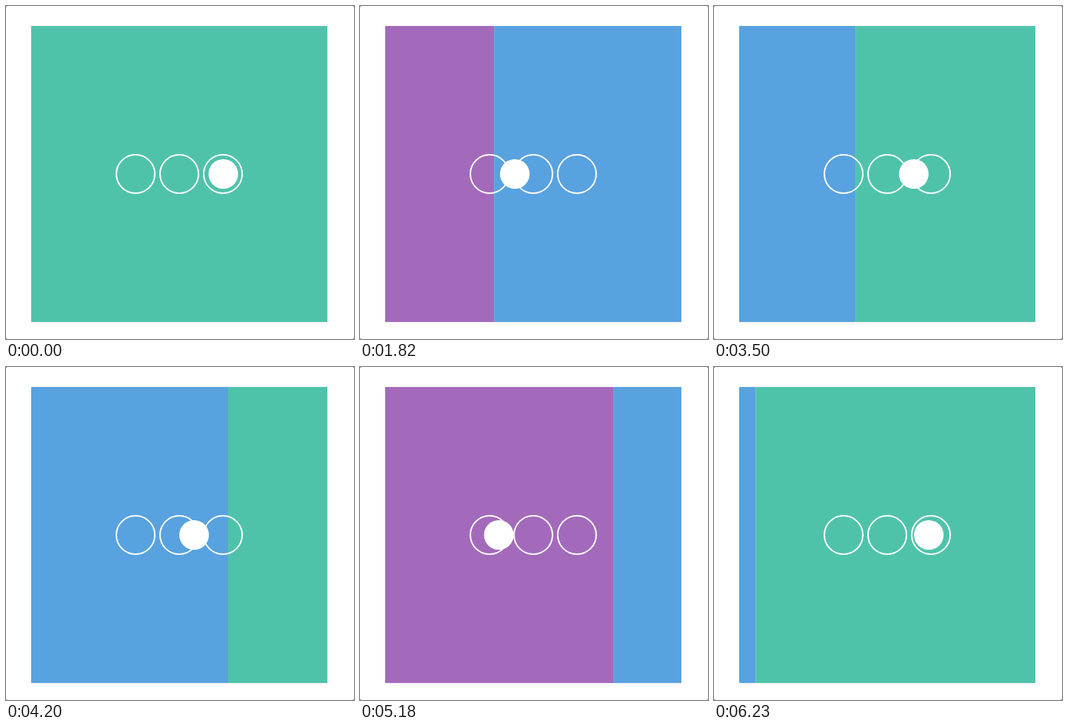
Animation of 470 by 450 pixels, one loop 6.3 s. Source, as an HTML page:

```html
<!DOCTYPE html>
<html lang="en">
<head>
<meta charset="utf-8">
<title>Sliding panels</title>
<style>
  html, body { margin: 0; width: 100%; height: 100%; overflow: hidden; background: #444; }
  #stage { position: relative; width: 470px; height: 450px; background: #fff; border-radius: 2px; overflow: hidden; }
  #window {
    position: absolute; left: 34px; top: 27px; width: 400px; height: 400px; overflow: hidden;
    box-shadow: 1px 2px 5px rgba(0, 0, 0, .05);
  }
  #strip { display: flex; width: 1200px; height: 400px; }
  #strip div { width: 400px; }
  .ring, #ball { position: absolute; box-sizing: border-box; border-radius: 50%; }
  .ring { top: 200px; width: 54px; height: 54px; border: 2px solid #fff; }
  #ball { left: 155px; top: 207px; width: 40px; height: 40px; background: #fff; }
</style>
</head>
<body>
<div id="stage">
  <div id="window">
    <div id="strip">
      <div style="background:#a36abb"></div>
      <div style="background:#58a2e0"></div>
      <div style="background:#4fc3aa"></div>
    </div>
  </div>
  <div class="ring" style="left:148px"></div>
  <div class="ring" style="left:207px"></div>
  <div class="ring" style="left:266px"></div>
  <div id="ball"></div>
</div>
<script>
  const LOOP = 6300, TICK = 70, DURATION = 1000;
  const PANEL_STEP = 400, BALL_STEP = 59.25;
  const strip = document.getElementById('strip');
  const ball = document.getElementById('ball');

  // Each move may interrupt the one before it.
  const moves = [
    { start: 1419, to: 0, ballDelay: -21 },
    { start: 2215, to: 1, ballDelay: 13 },
    { start: 3148, to: 2, ballDelay: 4 },
    { start: 3986, to: 0, ballDelay: 0 },
    { start: 5010, to: 1, ballDelay: 8 },
    { start: 5500, to: 2, ballDelay: 0 }
  ];

  const bezier = (u, a, b) => 3 * u * (1 - u) ** 2 * a + 3 * u * u * (1 - u) * b + u ** 3;

  // cubic-bezier(.25, .1, .25, 1), solved by bisection
  function ease(x) {
    if (x <= 0) return 0;
    if (x >= 1) return 1;
    let low = 0, high = 1;
    for (let i = 0; i < 24; i++) {
      const mid = (low + high) / 2;
      if (bezier(mid, .25, .25) < x) low = mid; else high = mid;
    }
    return bezier(low, .1, 1);
  }

  function position(time, delayOf) {
    let pos = 2;
    moves.forEach((move, i) => {
      const next = moves[i + 1];
      const end = next ? Math.min(time, next.start + delayOf(next)) : time;
      pos += (move.to - pos) * ease((end - move.start - delayOf(move)) / DURATION);
    });
    return pos;
  }

  function draw() {
    const time = Math.floor(performance.now() % LOOP / TICK) * TICK;
    const panelX = -PANEL_STEP * position(time, () => 0);
    const ballX = BALL_STEP * position(time, move => move.ballDelay);
    strip.style.transform = `translateX(${panelX}px)`;
    ball.style.transform = `translateX(${ballX}px)`;
    requestAnimationFrame(draw);
  }
  draw();
</script>
</body>
</html>
```
